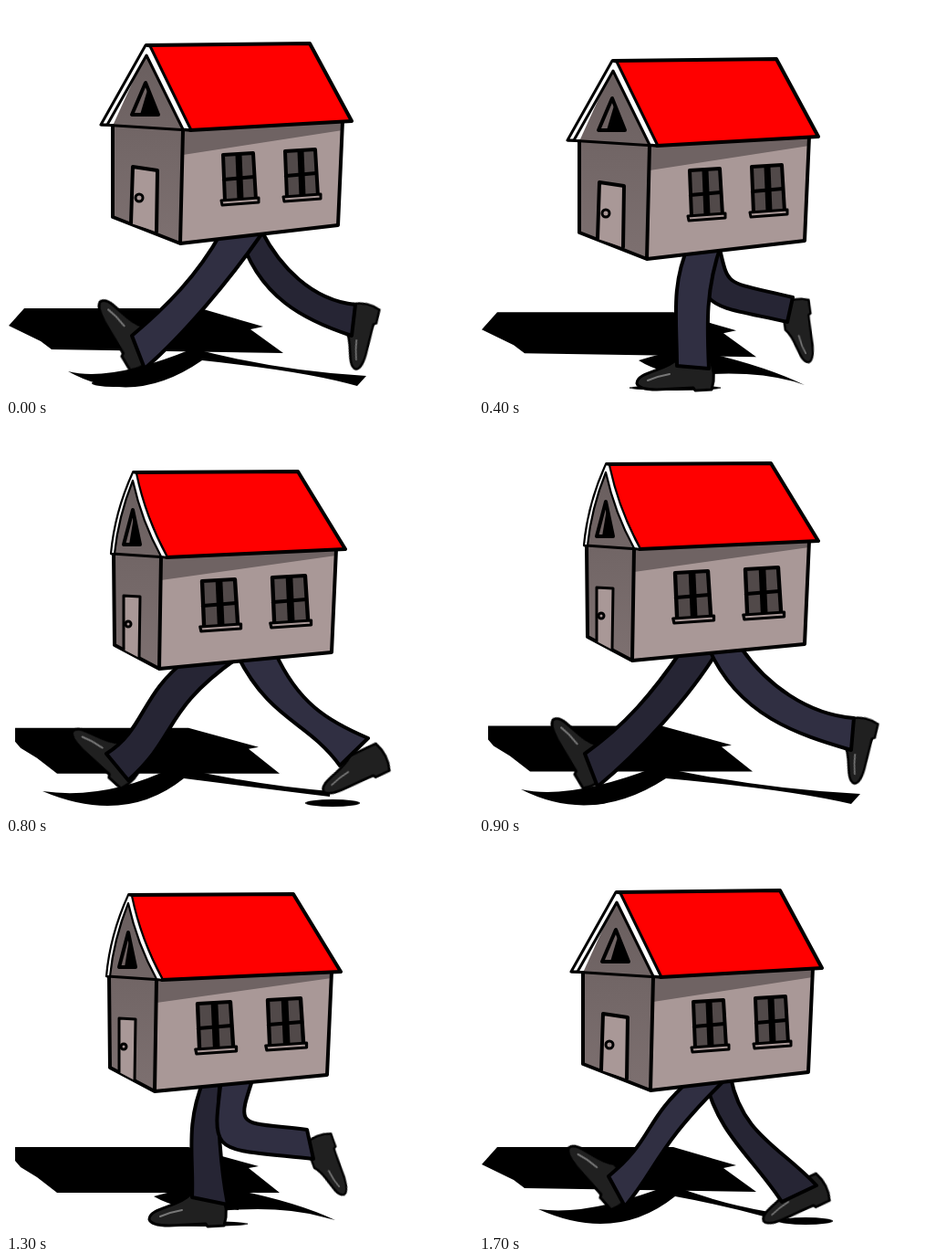
These frames come from a looping animation (512x427 px, 1800 ms). An HTML page without scripts:

```html
<!DOCTYPE html>
<html lang="en">
<head>
<meta charset="utf-8">
<title>Walking house</title>
<style>
@property --x { syntax: "<number>"; inherits: true; initial-value: 0; }
@property --y { syntax: "<number>"; inherits: true; initial-value: 0; }
html, body { margin: 0; width: 100%; height: 100%; overflow: hidden; background: #fff; }
svg { display: block; width: 100vw; height: 100vh; stroke-linejoin: round; stroke-linecap: round; }
svg, .leg, .shoe, .stride, .contact, .wide, .narrow { animation: bob 1.8s steps(2) infinite; }

.ink { fill: none; stroke: #000; stroke-width: 4; }
.thin { stroke-width: 3; }
.fine { stroke-width: 2.2; }
.wall { fill: #a99897; }
.front { fill: url(#dusk); }
.shade { fill: #6f6363; }
.red { fill: #f00; }
.white { fill: #fff; }
.pane { fill: #514949; }
.black { fill: #000; }

.house { translate: calc(var(--x) * 1px) calc(var(--y) * 1px); }
.ground { translate: 0 calc(var(--y) * .25px); }
.wide { animation-name: showWide; animation-timing-function: step-end; }
.narrow { animation-name: showNarrow; animation-timing-function: step-end; }
.leg { stroke: #000; stroke-width: 4; }
.near .leg { fill: #302f42; animation-name: nearLeg; }
.far .leg { fill: #262534; animation-name: farLeg; }
.near .shoe { animation-name: nearShoe; }
.far .shoe { animation-name: farShoe; }
.stride { animation-name: stride; }
.contact { animation-name: contact; animation-duration: .9s; }

@keyframes bob {
  0%, 100% { --x: 0; --y: 0; }
  11.11% { --x: -2; --y: 4; }
  22.22% { --x: -7; --y: 17; }
  33.33% { --x: 0; --y: 21; }
  44.44% { --x: 0; --y: 11; animation-timing-function: steps(1); }
  50% { --x: 0; --y: 2; }
  61.11% { --x: 0; --y: 4; }
  72.22% { --x: -5; --y: 16; }
  83.33% { --x: -6; --y: 21; }
  94.44% { --x: -3; --y: 12; animation-timing-function: steps(1); }
}
@keyframes showWide { 0%, 77.77% { visibility: visible; } 27.77% { visibility: hidden; } }
@keyframes showNarrow { 0%, 77.77% { visibility: hidden; } 27.77% { visibility: visible; } }

@keyframes nearLeg {
  0%, 100% { d: path("M236 248C210 295 175 330 138 361L152 397C195 360 245 300 280 250Z"); }
  11.11% { d: path("M228 250C203 300 170 335 148 383L178 401C190 350 233 295 262 252Z"); }
  22.22% { d: path("M230 262C210 305 217 345 217 394L252 397C250 350 248 310 266 260Z"); }
  33.33% { d: path("M246 262C252 340 285 335 302 396L354 384C325 335 290 330 284 260Z"); }
  44.44% { d: path("M254 254C290 325 330 325 366 374L397 344C352 325 320 305 295 250Z"); animation-timing-function: steps(1); }
  50% { d: path("M252 246C285 320 350 340 408 357L411 322C360 318 315 285 288 246Z"); }
  61.11% { d: path("M250 248C285 325 310 322 391 357L401 326C325 305 335 310 287 244Z"); }
  72.22% { d: path("M236 260C225 345 225 335 337 347L330 315C255 306 252 315 271 258Z"); }
  83.33% { d: path("M218 262C150 310 195 310 221 365L257 360C225 305 205 315 256 260Z"); }
  94.44% { d: path("M232 260C180 305 192 325 142 366L160 399C197 355 193 335 272 258Z"); animation-timing-function: steps(1); }
}
@keyframes farLeg {
  0%, 100% { d: path("M255 246C275 320 330 345 379 361L383 327C335 322 300 285 280 246Z"); }
  11.11% { d: path("M252 248C280 325 300 322 376 357L386 326C318 305 325 310 287 246Z"); }
  22.22% { d: path("M240 260C245 335 245 325 338 346L344 319C265 300 275 310 262 258Z"); }
  33.33% { d: path("M212 262C145 310 190 310 216 365L252 360C220 305 200 315 250 260Z"); }
  44.44% { d: path("M198 258C148 295 152 335 110 361L134 390C190 340 170 315 254 256Z"); animation-timing-function: steps(1); }
  50% { d: path("M222 248C190 295 160 330 116 361L130 397C175 360 230 300 262 248Z"); }
  61.11% { d: path("M225 248C195 300 160 335 138 383L168 401C180 350 225 295 255 248Z"); }
  72.22% { d: path("M217 260C196 310 206 345 204 389L243 397C236 360 230 300 235 260Z"); }
  83.33% { d: path("M236 262C240 340 270 335 285 396L337 384C308 335 278 330 272 260Z"); }
  94.44% { d: path("M248 260C262 320 300 345 332 394L370 376C332 335 288 320 276 258Z"); animation-timing-function: steps(1); }
}
@keyframes nearShoe {
  0%, 100% { transform: translate(148px, 370px) rotate(62deg) scale(1); }
  11.11% { transform: translate(162px, 389px) rotate(17deg) scale(1); }
  22.22% { transform: translate(235px, 396px) rotate(0deg) scale(1); }
  33.33% { transform: translate(331px, 395px) rotate(0deg) scale(1); }
  44.44% { transform: translate(395px, 366px) rotate(-22deg) scale(.92); animation-timing-function: steps(1); }
  50% { transform: translate(413px, 339px) rotate(-73deg) scale(.85); }
  61.11% { transform: translate(399px, 345px) rotate(-80deg) scale(.83); }
  72.22% { transform: translate(342px, 341px) rotate(-107deg) scale(.83); }
  83.33% { transform: translate(238px, 363px) rotate(-43deg) scale(.95); }
  94.44% { transform: translate(151px, 372px) rotate(51deg) scale(1); animation-timing-function: steps(1); }
}
@keyframes farShoe {
  0%, 100% { transform: translate(385px, 343px) rotate(-73deg) scale(.85); }
  11.11% { transform: translate(384px, 345px) rotate(-80deg) scale(.83); }
  22.22% { transform: translate(343px, 340px) rotate(-95deg) scale(.83); }
  33.33% { transform: translate(233px, 363px) rotate(-43deg) scale(.97); }
  44.44% { transform: translate(129px, 368px) rotate(45deg) scale(1); animation-timing-function: steps(1); }
  50% { transform: translate(126px, 370px) rotate(62deg) scale(1); }
  61.11% { transform: translate(152px, 389px) rotate(17deg) scale(1); }
  72.22% { transform: translate(219px, 396px) rotate(0deg) scale(1); }
  83.33% { transform: translate(316px, 395px) rotate(0deg) scale(1); }
  94.44% { transform: translate(359px, 379px) rotate(-22deg) scale(.92); animation-timing-function: steps(1); }
}
@keyframes stride {
  0%, 100% { d: path("M68 400Q115 412 205 375Q300 400 395 405L385 416Q330 400 215 388Q140 440 68 400Z"); }
  11.11% { d: path("M85 414Q155 405 205 375Q300 398 392 404L386 414Q325 400 212 388Q175 425 85 414Z"); }
  22.22% { d: path("M175 388Q200 380 230 375Q310 392 357 415L345 411Q300 399 240 404Q200 404 175 388Z"); }
  33.33%, 83.33% { d: path("M133 394Q165 384 230 368Q280 372 285 380L270 416Q240 416 205 416Q200 405 133 394Z"); }
  44.44% { d: path("M40 402Q110 412 185 375Q270 395 355 402L355 408Q290 400 195 388Q130 440 40 402Z"); animation-timing-function: steps(1); }
  50% { d: path("M46 400Q100 412 195 375Q310 400 418 405L408 416Q340 400 205 388Q125 440 46 400Z"); }
  61.11% { d: path("M75 414Q150 405 200 375Q300 398 405 404L398 415Q330 400 210 388Q170 425 75 414Z"); }
  72.22% { d: path("M162 388Q190 380 220 375Q310 390 361 414L345 410Q300 398 235 404Q190 404 162 388Z"); }
  94.44% { d: path("M65 402Q120 410 210 375Q260 395 318 405L320 412Q270 398 215 388Q150 440 65 402Z"); animation-timing-function: steps(1); }
}
@keyframes contact {
  0%, 100% { transform: translate(118px, 413px) scale(24, 4); }
  22.22% { transform: translate(122px, 416px) scale(46, 3); }
  44.44% { transform: translate(215px, 418px) scale(50, 3); }
  66.66% { transform: translate(278px, 417px) scale(72, 3); }
  88.88% { transform: translate(358px, 415px) scale(30, 4); animation-timing-function: steps(1); }
}
</style>
</head>
<body>
<svg viewBox="0 0 512 427" preserveAspectRatio="none">
  <defs>
    <linearGradient id="dusk" x2="0" y2="1">
      <stop stop-color="#695e5e"/><stop offset="1" stop-color="#7d7070"/>
    </linearGradient>
    <g id="window">
      <path class="ink pane" d="M0 0L33 -2L36 49L2 51Z"/>
      <path class="ink" stroke-linecap="butt" style="stroke-width:7" d="M17 0L19 49"/>
      <path class="ink" d="M1 27L34 24"/>
      <path class="ink wall thin" d="M-2 50L39 47V52L-1 55Z"/>
    </g>
    <g id="shoe">
      <path class="ink thin" style="fill:#202020" d="M-17 -10C-30 4 -61 4 -62 17Q-60 24 -40 24L0 22L2 25L20 24Q26 6 17 -12Z"/>
      <path d="M-50 14Q-38 9 -26 7" fill="none" stroke="#777" stroke-width="2"/>
    </g>
  </defs>

  <g class="ground">
    <path class="wide" d="M20 331H213L282 351L268 354L304 380L50 376L38 367L3 350Z"/>
    <path class="narrow" d="M10 330H200L277 351L266 353L300 380L56 380L34 363L16 352L10 345Z"/>
  </g>
  <path class="stride"/>
  <circle class="contact" r="1"/>

  <g class="far"><use class="shoe" href="#shoe"/><path class="leg"/></g>
  <g class="near"><use class="shoe" href="#shoe"/><path class="leg"/></g>

  <g class="house">
    <g class="wide">
      <path class="front" d="M117 131L154 50L194 136L191 260L117 231Z"/>
      <path class="wall" d="M194 136L369 126L364 240L191 260Z"/>
      <path class="shade" d="M194 136L369 126V136L194 163Z"/>
      <path class="ink" d="M117 131V231L191 260L194 136M191 260L364 240L369 126"/>
      <path class="ink thin" d="M105 130L200 136"/>
      <path class="ink red" d="M154 43L333 41L379 126L202 136Z"/>
      <path class="ink white thin" d="M153 43L104 130L111 130L154 54L194 135L203 136L158 44Z"/>
      <path class="ink shade" d="M153 84L138 119H167Z"/>
      <path class="black" d="M155 92L147 119H166Z"/>
      <path class="ink wall" d="M165 247L166 180L139 176L137 238"/>
      <circle class="ink wall thin" cx="146" cy="210" r="4"/>
      <use href="#window" x="238" y="163"/>
      <use href="#window" x="306" y="159"/>
    </g>
    <g class="narrow" transform="translate(0 -4)">
      <path class="front" d="M118 135Q122 95 140 50Q152 100 170 138L168 261L119 235Z"/>
      <path class="wall" d="M170 138L362 130L357 243L168 261Z"/>
      <path class="shade" d="M170 138L362 130V137L170 164Z"/>
      <path class="ink" d="M118 135L119 235L168 261L170 138M168 261L357 243L362 130"/>
      <path class="ink thin" d="M116 135L176 139"/>
      <path class="ink red" d="M140 46L320 45L372 130L176 139Q152 95 140 46Z"/>
      <path class="ink white fine" d="M139 46Q119 90 115 135L119 135Q123 95 139 55Q149 100 170 138L177 139Q153 95 143 47Z"/>
      <path class="ink shade" d="M139 87L129 125H147Z"/>
      <path class="black" d="M140 95L135 125H147Z"/>
      <path class="ink wall thin" d="M146 249L147 182L129 181V240"/>
      <circle class="ink wall thin" cx="134" cy="212" r="3"/>
      <use href="#window" transform="translate(215 165) scale(1.09 1)"/>
      <use href="#window" transform="translate(292 161) scale(1.09 1)"/>
    </g>
  </g>
</svg>
</body>
</html>
```
